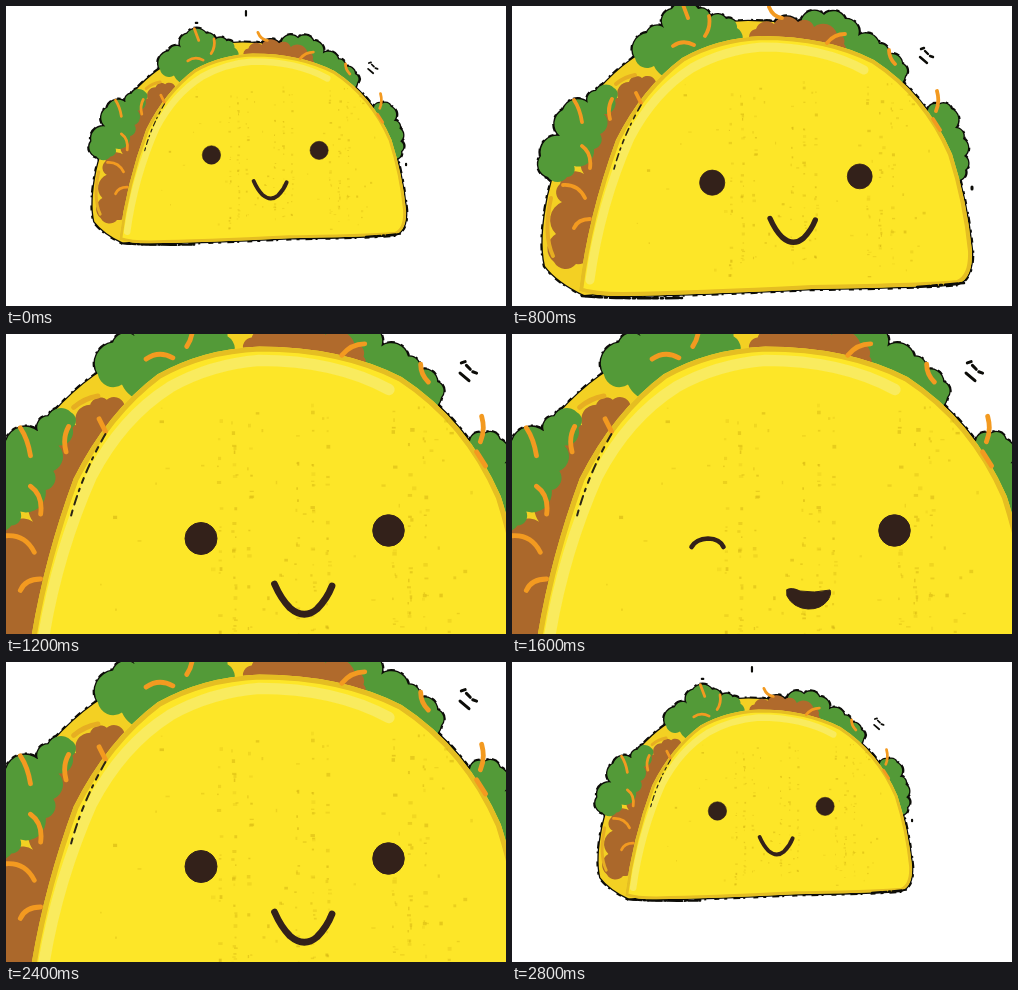
Recreate the animation shown at these times as an HTML page. Size 500 by 300 pixels, loop 3000 ms.

```html
<!DOCTYPE html>
<html lang="en">
<head>
<meta charset="utf-8">
<title>Winking taco</title>
<style>
  html, body { margin: 0; width: 100%; height: 100%; overflow: hidden; background: #fff; }
  svg { display: block; width: 100vw; height: 100vh; }
  #fills path { vector-effect: non-scaling-stroke; }
  .line { fill: none; stroke-linecap: round; stroke-linejoin: round; }
</style>
</head>
<body>
<svg viewBox="0 0 500 300">
  <defs>
    <clipPath id="frontClip"><path id="frontClipPath"/></clipPath>
  </defs>
  <g id="body">
    <use href="#fills" stroke="#0c0c08" stroke-width="4.500" stroke-dasharray="3 5 5 8 2 3 7 6"/>
    <use href="#fills" stroke="#0c0c08" stroke-width="2.600"/>
    <g id="fills">
      <path fill="#f3d023" d="M72 289Q45 276 33 260Q27 235 36 190Q45 150 62 115Q95 68 128 48Q180 16 236 15L262 16L300 60V270Z"/>
      <path id="leftMeat" fill="#ab682b"/>
      <path id="leftLeaf" fill="#539a38"/>
      <path id="topLeaf" fill="#539a38"/>
      <path id="rightLeaf" fill="#539a38"/>
      <path id="farLeaf" fill="#539a38"/>
      <path id="topMeat" fill="#b06a2c"/>
      <path id="front" fill="#fde628"/>
    </g>
    <g class="line" stroke="#e6ae22" stroke-width="4">
      <path d="M104 78Q112 71 123 69"/>
      <path d="M39 192Q31 228 41 250"/>
    </g>
    <g clip-path="url(#frontClip)">
      <path class="line" stroke="#f9eb5e" stroke-width="9" d="M78 274Q88 200 118 132Q142 86 180 62Q212 44 250 41Q310 41 352 64"/>
      <path id="edge" class="line" stroke="#e5be22" stroke-width="8"/>
      <g id="specks" fill="#d3b212"/>
    </g>
    <path class="line" stroke="#f39a20" stroke-width="3.800" d="M62 94Q68 103 70 116M100 93Q95 102 98 113M70 140Q80 147 78 162M51 179Q66 178 73 192M62 222Q66 213 78 213M124 87L129 97M161 40Q171 33 182 39M170 -4L176 12M197 10Q199 21 193 30M257 1Q261 11 270 12M315 37Q322 28 333 28M377 44Q377 52 383 58M425 85Q428 96 424 105M421 113L428 124"/>
    <path class="line" stroke="#2a2414" stroke-width="1.600" stroke-dasharray="4 5 7 4 2 5" d="M102 163Q111 130 129 99"/>
    <path class="line" stroke="#0c0c08" stroke-width="2.400" d="M409 43L412 42M408 51L415 57M413 45L416 48M418 50L421 51"/>
    <path class="line" stroke="#0c0c08" stroke-width="3" d="M240.700 -28V-22M172 -12H174M460 181V183"/>
    <path class="line" stroke="#0c0c08" stroke-width="2.500" stroke-dasharray="13 2 5 3 2 3" d="M70 290Q100 293 170 292M405 281L452 277"/>
  </g>
  <g id="face" fill="#33211a" stroke="#33211a">
    <circle cx="382.500" cy="196.500" r="15.800"/>
    <circle id="openEye" cx="195" cy="204.500" r="16"/>
    <path id="closedEye" class="line" stroke-width="4.600" d="M179.500 213Q184 205 196 204.500Q208 205 211.500 213"/>
    <path id="lashes" class="line" stroke-width="2.200" d="M177.500 188.500L183 196M194 181L195 194M214 188.500L207 198"/>
    <path id="mouth" stroke-linecap="round" stroke-linejoin="round"/>
  </g>
</svg>
<script>
const $ = id => document.getElementById(id);
const SVG = "http://www.w3.org/2000/svg";

// Closed outline with a round lobe between each pair of neighbouring points.
function lobes(id, text) {
  const points = text.split(" ").map(p => p.split(",").map(Number));
  let d = "M" + points[0];
  points.forEach(([x, y], i) => {
    const [nx, ny] = points[(i + 1) % points.length];
    const r = Math.hypot(nx - x, ny - y) * 0.6;
    d += `A${r} ${r} 0 0 1 ${nx} ${ny}`;
  });
  $(id).setAttribute("d", d + "Z");
}

lobes("leftMeat", "42,256 44,228 50,196 48,178 72,168 84,136 88,108 106,92 117,76 130,72 144,76 146,88 110,150 80,240 64,258");
lobes("leftLeaf", "36,171 29,150 48,130 51,104 76,97 84,85 102,82 103,94 92,108 88,128 82,143 62,160 55,171");
lobes("topLeaf", "123,52 135,27 152,22 160,3 186,3 198,12 214,13 225,22 226,42 180,66 142,60");
lobes("rightLeaf", "290,13 312,9 333,13 346,30 367,38 376,49 390,58 393,70 370,80 320,45");
lobes("farLeaf", "416,104 427,99 439,103 443,122 451,133 452,150 453,164 445,174 425,135");
lobes("topMeat", "238,34 244,23 262,18 286,16 302,21 325,28 332,38 330,48 280,46");

const frontShape = "M67 285Q76 210 104 134Q130 82 170 52Q205 32 250 30Q315 30 362 54Q414 88 440 148Q455 195 460 245Q461 272 446 278Q420 281 300 283Q180 289 110 290Q82 290 67 285Z";
for (const id of ["front", "frontClipPath", "edge"]) $(id).setAttribute("d", frontShape);

let seed = 11;
const random = () => (seed = (seed * 16807) % 2147483647) / 2147483647;

// Faint paper grain, densest along a few vertical threads.
const threads = [216, 278, 354];
for (let i = 0; i < 220; i++) {
  const speck = document.createElementNS(SVG, "rect");
  const thread = threads[i % 3] + 12 * Math.floor(random() * 3);
  const set = {
    x: i % 4 ? thread + random() * 3 : 120 + random() * 320,
    y: 75 + random() * 195,
    width: 1 + random() * 2.5,
    height: 1 + random() * 2,
    opacity: 0.2 + random() * 0.4
  };
  for (const key in set) speck.setAttribute(key, set[key].toFixed(2));
  $("specks").append(speck);
}

const mouths = {
  smile: "M268.5 250Q275 265 284 274Q298 286 311 275Q321 265 326 252",
  grin: "M268 251Q297 267 327 252Q318 283 298 283Q277 281 268 251Z",
  open: "M275 255.5Q280 253 288 257Q302 259.5 318 256Q320 259 316 266Q309 275.5 296 275Q281 274 275 262Z",
  laugh: "M275 247Q285 252 298 251Q310 251 319 247Q323 262 314 272Q305 281 296 279Q276 275 275 247Z"
};

// [start ms, zoom, mouth, left eye]
const FULL = 1.271;
const steps = [
  [0, 0.73, "smile", "open"],
  [600, 0.864, "smile", "open"],
  [800, 1, "smile", "open"],
  [1000, 1.136, "smile", "open"],
  [1200, FULL, "smile", "open"],
  [1400, FULL, "grin", "open"],
  [1600, FULL, "open", "shut"],
  [1800, FULL, "laugh", "wink"],
  [2000, FULL, "open", "wink"],
  [2200, FULL, "grin", "open"],
  [2400, FULL, "smile", "open"],
  [2600, 1, "smile", "open"],
  [2800, 0.73, "smile", "open"]
];

function zoomAbout(id, x, y, scale) {
  $(id).setAttribute("transform", `translate(${x} ${y}) scale(${scale}) translate(${-x} ${-y})`);
}
const show = (id, visible) => $(id).setAttribute("visibility", visible ? "visible" : "hidden");

let current;
function draw(now) {
  const time = now % 3000;
  const step = steps.findLast(s => s[0] <= time);
  if (step !== current) {
    current = step;
    const [, zoom, mouth, eye] = step;
    zoomAbout("body", 238, 95, zoom);
    zoomAbout("face", 219.5, 74, zoom / FULL);
    $("mouth").setAttribute("d", mouths[mouth]);
    $("mouth").setAttribute("fill", mouth === "smile" ? "none" : "#33211a");
    $("mouth").setAttribute("stroke-width", mouth === "smile" ? 6.8 : 1);
    show("openEye", eye === "open");
    show("closedEye", eye !== "open");
    show("lashes", eye === "wink");
  }
}

const start = performance.now();
function tick() {
  draw(Math.max(0, performance.now() - start));
  requestAnimationFrame(tick);
}
tick();
</script>
</body>
</html>
```
